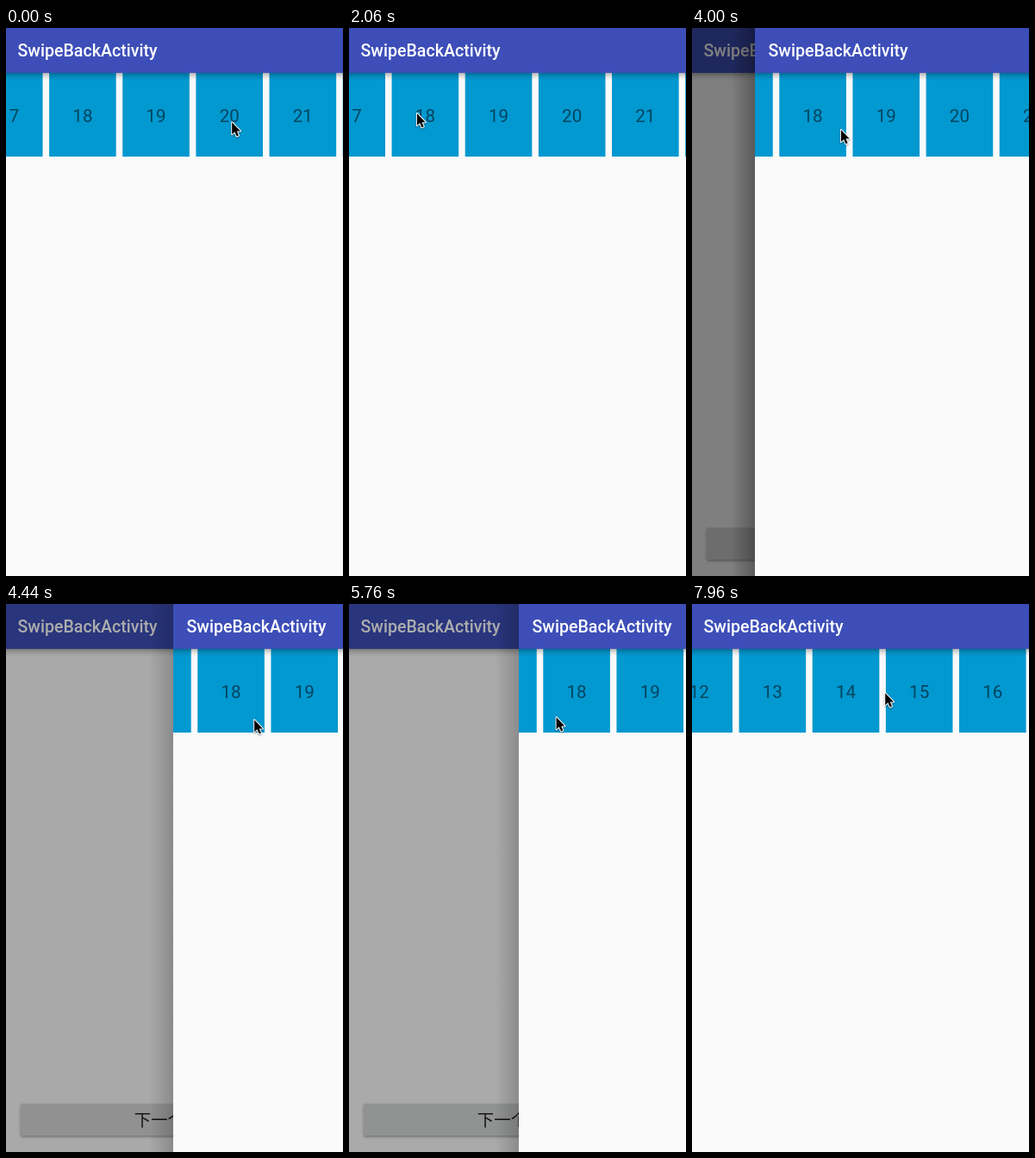
Write an HTML page with a canvas that moves like this. It is 391 px wide and 635 px high and loops after 8 s.

```html
<!DOCTYPE html>
<html lang="zh">
<head>
<meta charset="utf-8">
<title>SwipeBackActivity</title>
<style>
html, body { margin: 0; width: 391px; height: 635px; overflow: hidden; background: #fafafa; }
canvas { display: block; }
</style>
</head>
<body>
<canvas id="stage" width="391" height="635"></canvas>
<script>
const W = 391, H = 635, LOOP = 8000, STEP = 147.5;
const BAR = 52, PITCH = 85.15, TILE = 77.6, TILE_H = 97;
const ctx = document.getElementById('stage').getContext('2d');

// Smooth progress from 0 to 1 while k runs from a to b.
function ease(k, a, b) {
  const u = Math.min(1, Math.max(0, (k - a) / (b - a)));
  return u * u * (3 - 2 * u);
}

function pose(k) {
  const right = ease(k, 0, 8), left = ease(k, 8, 16), fling = ease(k, 45, 54);
  const leave = ease(k, 8, 18), enter = ease(k, 21, 22);
  const pull = ease(k, 22, 31.9), back = ease(k, 36, 44);
  return {
    first: 50.1 + 125.2 * right - 149 * left + 454 * fling,
    shift: Math.round(291 * (ease(k, 23.5, 34) - back)),
    x: 261 - 31 * right - 235 * leave + 29 * enter + 291 * pull - 239 * back + 147 * fling,
    y: 108 - 7 * right - 5 * leave + 41 * pull - 22 * back - 13 * fling
  };
}

function rect(x, y, w, h, color) {
  ctx.fillStyle = color;
  ctx.fillRect(x, y, w, h);
}

function text(str, x, y, font, color, align) {
  ctx.font = font;
  ctx.fillStyle = color;
  ctx.textAlign = align;
  ctx.fillText(str, x, y);
}

function fade(x0, y0, x1, y1, stops) {
  const g = ctx.createLinearGradient(x0, y0, x1, y1);
  stops.forEach((a, i) => g.addColorStop(i / (stops.length - 1), `rgba(0,0,0,${a})`));
  return g;
}

function appBar() {
  rect(-2, BAR, W + 7, 10, fade(0, BAR, 0, BAR + 10, [.3, .13, .04, 0]));
  rect(-2, 0, W + 7, BAR, '#3d4eb8');
  text('SwipeBackActivity', 13.5, 33, '500 19.6px Roboto, sans-serif', '#fff', 'left');
}

function backPage() {
  rect(0, 0, W, H, '#fafafa');
  appBar();
  ctx.save();
  ctx.shadowColor = 'rgba(0,0,0,.35)';
  ctx.shadowBlur = 3;
  ctx.shadowOffsetY = 1.5;
  ctx.fillStyle = '#d6d7d7';
  ctx.beginPath();
  ctx.roundRect(17, 579, 360, 37, 2);
  ctx.fill();
  ctx.restore();
  text('下一个界面', 197.3, 604.5, '19.4px "Noto Sans CJK SC", "Noto Sans CJK", sans-serif',
    'rgba(0,0,0,.87)', 'center');
}

function dim(shift) {
  const edge = shift - 2, depth = .36 * (1 - shift / 394);
  rect(0, 0, W, H, `rgba(0,0,0,${.6 - .0014 * shift})`);
  rect(edge - 28, 0, 28, H, fade(edge - 28, 0, edge, 0, [0, depth]));
}

function listPage(first) {
  rect(-2, 0, W + 7, H, '#fafafa');
  for (let n = 0; n < 40; n++) {
    const x = first + (n - 18) * PITCH;
    rect(x, BAR, TILE, TILE_H, '#0298d0');
    text(n, x + TILE / 2, 109, '20.6px Roboto, sans-serif', 'rgba(0,0,0,.54)', 'center');
  }
  appBar();
}

function cursor(x, y) {
  const arrow = new Path2D('M.5 .5V14.5L3.7 11.6L6 16.8L8.3 15.8L6.1 10.7H10.3Z');
  ctx.save();
  ctx.translate(x + .7, y + .7);
  ctx.lineJoin = 'round';
  ctx.shadowColor = 'rgba(0,0,0,.4)';
  ctx.shadowBlur = 2;
  ctx.shadowOffsetY = 1;
  ctx.strokeStyle = '#fff';
  ctx.lineWidth = 2;
  ctx.stroke(arrow);
  ctx.shadowColor = 'transparent';
  ctx.fillStyle = '#000';
  ctx.fill(arrow);
  ctx.restore();
}

function draw(t) {
  const { first, shift, x, y } = pose(Math.floor((t % LOOP + 8) / STEP));
  if (shift > 0) {
    backPage();
    dim(shift);
  }
  ctx.save();
  ctx.translate(shift, 0);
  ctx.beginPath();
  ctx.rect(-2, 0, W + 5, H);
  ctx.clip();
  listPage(first);
  ctx.restore();
  cursor(x, y);
}

const start = performance.now();
function tick() {
  draw(performance.now() - start);
  requestAnimationFrame(tick);
}
tick();
</script>
</body>
</html>
```
